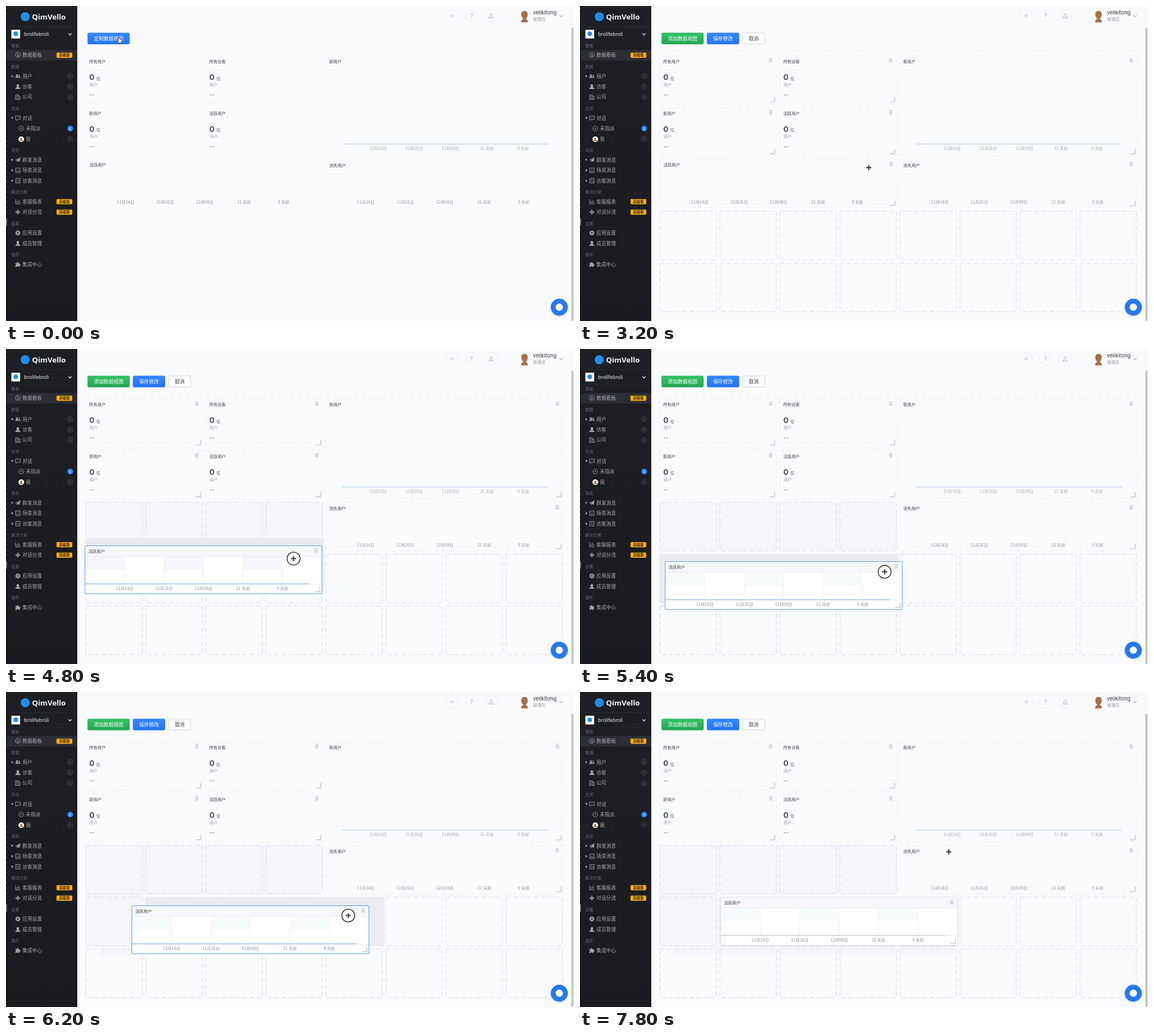
An HTML page that plays this animation: 1004x558 px, repeating every 8000 ms.

```html
<!DOCTYPE html>
<html>
<head>
<meta charset="utf-8">
<title>Dashboard layout</title>
<style>
html, body { margin: 0; width: 100%; height: 100%; overflow: hidden; background: #f9fafc; }
svg { display: block; width: 1004px; height: 558px; }
text { font-family: 'Noto Sans CJK SC', 'Noto Sans CJK JP', 'Noto Sans', sans-serif; white-space: pre; }
.latin { font-family: Inter, 'Noto Sans', sans-serif; }
.brand { font-family: 'Open Sans', 'Noto Sans', sans-serif; }
.dashes { font-family: 'Liberation Sans', sans-serif; letter-spacing: .9px; }
</style>
</head>
<body>
<svg id="stage" viewBox="0 0 1004 558">
  <defs>
    <linearGradient id="blue" x2="0" y2="1"><stop stop-color="#3488ff"/><stop offset="1" stop-color="#2474f4"/></linearGradient>
    <linearGradient id="green" x2="0" y2="1"><stop stop-color="#31c266"/><stop offset="1" stop-color="#23a853"/></linearGradient>
    <linearGradient id="side" x2="0" y2="1"><stop stop-color="#1d1f23"/><stop offset="1" stop-color="#191b1e"/></linearGradient>
    <filter id="soft" x="-40%" y="-40%" width="180%" height="180%"><feDropShadow dx="0" dy="1" stdDeviation="1.6" flood-color="#234" flood-opacity=".3"/></filter>
    <filter id="faint" x="-5%" y="-10%" width="110%" height="125%"><feDropShadow dx="0" dy="1" stdDeviation="1.4" flood-color="#334" flood-opacity=".12"/></filter>
  </defs>
</svg>
<script>
const NS = 'http://www.w3.org/2000/svg';
const stage = document.getElementById('stage');

function add(parent, tag, attrs = {}) {
  const el = document.createElementNS(NS, tag);
  set(el, attrs);
  return parent.appendChild(el);
}
function set(el, attrs) { for (const k in attrs) el.setAttribute(k, attrs[k]); }
const group = (p, attrs) => add(p, 'g', attrs);
const rect = (p, x, y, width, height, fill, more) => add(p, 'rect', { x, y, width, height, fill, ...more });
const circle = (p, cx, cy, r, fill, more) => add(p, 'circle', { cx, cy, r, fill, ...more });
const path = (p, d, more) => add(p, 'path', { d, fill: 'none', ...more });

// y is the optical middle of the line
function text(p, x, y, str, size, fill, more) {
  const el = add(p, 'text', { x, y: y + size * 0.37, 'font-size': size, fill, ...more });
  el.textContent = str;
  return el;
}
const centred = (p, x, y, str, size, fill, more) =>
  text(p, x, y, str, size, fill, { 'text-anchor': 'middle', ...more });

const PERSON = 'M-4.4 4.2C-4.4 1.8-2.4 1.6-1.3.9-3-1.2-2.6-4.3 0-4.3S3-1.2 1.3.9C2.4 1.6 4.4 1.8 4.4 4.2z';
const ICONS = {
  gauge: { line: 'M-2.6 3.3A4.3 4.3 0 1 1 2.6 3.3zM0 2L-1-2M0 2L2-1' },
  users: { fill: 'M-4.8 3C-4.8 1-3.3 1-2.6.6-4-1.2-3.4-3.4-1.6-3.4S.6-1.2-.6.6C.2 1 1.6 1 1.6 3zM2.2 3C2.2 1.6 1.6 1 1 .6 2-1 1.6-2.4 1-3 3.4-3.6 4-1 2.8.6 3.6 1 4.8 1 4.8 3z' },
  user: { fill: PERSON },
  building: { line: 'M-4 4.2V-4H1V4.2M1-1.5H4V4.2M-4.6 4.2H4.6M-2.5-2H-.5M-2.5 0H-.5M-2.5 2H-.5' },
  chat: { line: 'M-4.3-3.6H4.3V2.4H-1L-3 4.2V2.4H-4.3zM-2-.6H-1.4M-.3-.6H.3M1.4-.6H2' },
  target: { line: 'M-4.2 0A4.2 4.2 0 1 1 4.2 0A4.2 4.2 0 1 1-4.2 0M-1.3 0H1.3M0-1.3V1.3' },
  plane: { fill: 'M-4.6.6L4.5-4.2 3 3.8.2 2.5-1.6 4.4-1.7 1.8 2.6-2.2-2.8 1.5z' },
  card: { line: 'M-4-4H4V4H-4zM-2.4 2.4C-2 .4 2 .4 2.4 2.4M0-2.2V-.4' },
  feed: { line: 'M-4-4H4V4H-4zM-2.2-1.8C.6-1.8 2-.2 2 2.2M-2.2.4C-.8.4-.2 1-.2 2.2' },
  bars: { line: 'M-4-4V4H4.4M-1.8 2.4V-.6M.6 2.4V-3.4M3 2.4V-1.4' },
  split: { fill: 'M0-4.6L2-2.3H.7V-.7H2.3V-2L4.6 0 2.3 2V.7H.7V2.3H2L0 4.6-2 2.3H-.7V.7H-2.3V2L-4.6 0-2.3-2V-.7H-.7V-2.3H-2z' },
  puzzle: { fill: 'M-4.4-2H-1.6C-2.6-4.6 1.4-4.6.6-2H3V.2C5.4-.6 5.4 3 3 2.2V4.4H.6C1.2 2.4-1.8 2.4-1.4 4.4H-4.4V2C-2.4 2.6-2.4-.4-4.4.2z' }
};
function icon(p, name, x, y, color) {
  const g = group(p, { transform: `translate(${x} ${y})` });
  if (name === 'gear') {
    circle(g, 0, 0, 2.4, 'none', { stroke: color, 'stroke-width': 1.9 });
    circle(g, 0, 0, 3.8, 'none', { stroke: color, 'stroke-width': 1.6, 'stroke-dasharray': '1.7 1.28' });
  } else if (ICONS[name].fill) path(g, ICONS[name].fill, { fill: color });
  else path(g, ICONS[name].line, { stroke: color, 'stroke-width': 0.9 });
}

function sidebar() {
  const g = group(stage);
  rect(g, 0, 0, 126, 558, 'url(#side)');
  rect(g, 0, 0, 1.5, 558, '#101113');
  path(g, 'M.6 4V22M.6 238V372', { stroke: '#777', 'stroke-width': 1, 'stroke-dasharray': '2 7' });
  rect(g, 0, 376, 1.5, 13, '#8c8f94');
  rect(g, 1.5, 36, 124.5, 1, '#292b30');
  rect(g, 1.5, 63, 124.5, 1, '#24262a');
  rect(g, 1.5, 78, 124.5, 18.5, '#2c2e35');
  circle(g, 34, 19, 8, '#1f8ceb');
  text(g, 46, 19.5, 'QimVello', 13.2, '#f4f5f6', { class: 'brand', 'font-weight': 700 });
  rect(g, 9.5, 42, 15.5, 15.5, '#fff', { rx: 1 });
  circle(g, 17.2, 49.2, 4, '#2389e8');
  text(g, 32, 49.5, 'brolifebroli', 8.7, '#e8e9eb', { class: 'latin' });
  path(g, 'M110.5 48.5L113.3 51.5 116 48.5', { stroke: '#ddd', 'stroke-width': 1.4 });

  const heads = [['看板', 70.5], ['数据', 107], ['交流', 181.5], ['消息', 255.5],
    ['解决方案', 329.5], ['设置', 385], ['插件', 440.5]];
  for (const [s, y] of heads) text(g, 9, y, s, 7.2, '#686a70');

  // label, y, icon, arrow, badge
  const rows = [['数据看板', 87, 'gauge', '', 'pro'], ['用户', 124.3, 'users', 'r', '0'],
    ['访客', 142.7, 'user', '', '0'], ['公司', 161.2, 'building', '', '0'], ['对话', 198.5, 'chat', 'd', ''],
    ['群发消息', 272.3, 'plane', 'r', ''], ['场景消息', 291, 'card', 'r', ''], ['访客消息', 309.5, 'feed', 'r', ''],
    ['客服报表', 346.5, 'bars', '', 'pro'], ['对话分流', 365, 'split', '', 'pro'],
    ['应用设置', 402, 'gear', '', ''], ['成员管理', 420.5, 'user', '', ''], ['集成中心', 457.5, 'puzzle', '', '']];
  for (const [s, y, name, arrow, badge] of rows) {
    icon(g, name, 21, y, '#a4a6ab');
    text(g, 29, y, s, 8.65, '#a9abb0');
    if (arrow) path(g, arrow === 'r' ? `M9.8 ${y - 2.4}L13.2 ${y} 9.8 ${y + 2.4}z` : `M8.8 ${y - 1.5}H13.6L11.2 ${y + 1.8}z`, { fill: '#a4a6ab' });
    if (badge === 'pro') {
      rect(g, 89.3, y - 4.6, 27.8, 9.3, '#fbae17', { rx: 1.6 });
      centred(g, 103.2, y, '高级版', 6.3, '#3a2a08', { 'font-weight': 700 });
    }
    if (badge === '0') count(g, y, false);
  }
  icon(g, 'target', 27, 217, '#a4a6ab');
  text(g, 35, 217, '未指派', 8.65, '#a9abb0');
  count(g, 217, true);
  circle(g, 27, 236, 5, '#fff');
  path(g, PERSON, { fill: '#a8704a', transform: 'translate(27 236.2) scale(.72)' });
  text(g, 35, 235.8, '我', 8.65, '#a9abb0');
  count(g, 235.8, false);
}
function count(g, y, on) {
  circle(g, 113.4, y, 4.8, on ? '#2a7cf6' : 'none', { stroke: on ? '#2a7cf6' : '#55575c', 'stroke-width': 0.8 });
  centred(g, 113.4, y, '0', 7, on ? '#fff' : '#75777c');
}

function topbar() {
  const g = group(stage);
  for (const x of [789, 823, 857.5])
    circle(g, x, 17.5, 10.6, 'none', { stroke: '#dcdee2', 'stroke-width': 0.8, 'stroke-dasharray': '2.5 1.6' });
  path(g, 'M785 17.5H793M789 13.5V21.5', { stroke: '#c0c2c6', 'stroke-width': 0.9 });
  centred(g, 823, 17.5, '?', 10.5, '#b0b2b6', { class: 'latin' });
  path(g, PERSON, { stroke: '#b0b2b6', 'stroke-width': 1.1, transform: 'translate(857.5 17.5) scale(.9)' });
  path(g, 'M910.5 29C910.5 24.5 912.5 24 914.6 23 908.5 17 910 8.5 916.5 8.5S924.5 17 918.6 23C920.6 24 922.3 24.5 922.3 29z', { fill: '#a8704a' });
  text(g, 931.5, 12, 'velikitong', 9.2, '#33363b', { class: 'latin' });
  text(g, 931.5, 23.3, '管理员', 7.4, '#96999e');
  path(g, 'M978.3 16.3L981 19 983.8 16.3', { stroke: '#888b90', 'stroke-width': 1 });
  rect(g, 999.5, 38, 3.5, 520, '#c1c2c4', { rx: 1.7 });
}

function button(p, x, w, label, fill, ink, stroke) {
  rect(p, x, 47.8, w, 19.6, fill, { rx: 2, stroke, 'stroke-width': 0.7 });
  centred(p, x + w / 2, 57.6, label, 8.7, ink);
}
function frame(p, x, y, w, h, color, width) {
  rect(p, x, y, w, h, 'none', { stroke: color, 'stroke-width': width, 'stroke-dasharray': '7.5 5' });
}
function tools(p, trashX, trashY, x, y) {
  rect(p, trashX - 2.9, trashY - 2.2, 5.8, 6.2, '#dadce0', { rx: 0.6 });
  path(p, `M${trashX - 3.6} ${trashY - 3.2}H${trashX + 3.6}M${trashX - 1.2} ${trashY - 4.2}H${trashX + 1.2}`, { stroke: '#d0d2d6', 'stroke-width': 0.9 });
  path(p, `M${x - 9} ${y}H${x}V${y - 9}`, { stroke: '#b6b8bc', 'stroke-width': 1.1 });
}
const DATES = ['11月14日', '11月26日', '12月08日', '21 天前', '9 天前'];
function dates(p, x, y, gap, ink) {
  DATES.forEach((s, i) => centred(p, x + i * gap, y, s, 7.3, ink, { 'font-weight': 300 }));
}
const INK = '#3f4247', SOLID = '#dfe0e4', LIGHT = '#ebecef', WASH = '#f5f6fa';

function cells(p, row, from, to) {
  for (let i = from; i < to; i++) frame(p, 141.3 + i * 106.07, 88 + row * 91.85, 99.6, 86, SOLID, 1.2);
}

sidebar();
topbar();

const view = group(stage);
button(view, 144.4, 73.8, '定制数据视图', 'url(#blue)', '#fff', '#2878f4');

const edit = group(stage);
button(edit, 144.4, 73.8, '添加数据视图', 'url(#green)', '#fff', '#26ac56');
button(edit, 224.6, 56.4, '保存修改', 'url(#blue)', '#fff', '#2878f4');
button(edit, 287.6, 39, '取消', '#fdfdfe', INK, '#bfc2c8');
cells(edit, 3, 0, 8);
cells(edit, 4, 0, 8);

const stats = group(stage);
const cards = [['所有用户', 141, 88], ['所有访客', 353.2, 88], ['新用户', 141, 179.8], ['活跃用户', 353.2, 179.8]];
for (const [s, x, y] of cards) {
  text(stats, x + 6, y + 10.2, s, 7.3, INK);
  text(stats, x + 6.3, y + 37.8, '0', 13.5, '#33363b', { class: 'latin', 'font-weight': 600 });
  text(stats, x + 18.6, y + 40, '位', 7.2, '#55585d');
  text(stats, x + 6.6, y + 51.8, '用户', 7.2, '#a2a4a9', { 'font-weight': 300 });
  text(stats, x + 6.6, y + 68.2, '--', 10.5, '#55585d', { class: 'dashes' });
  frame(edit, x + 0.3, y, 206, 86, LIGHT, 0.9);
  tools(edit, x + 196, y + 8.6, x + 203, y + 82);
}
text(stats, 571.3, 98.2, '新用户', 7.3, INK);
rect(stats, 594, 244, 363.5, 1, '#b3cae6');
dates(stats, 657.8, 252.7, 64.1, '#a8aaae');
text(stats, 571.3, 282, '流失用户', 7.3, INK);
dates(stats, 636, 347.7, 69.8, '#96989d');
frame(edit, 565.5, 88, 419, 177.6, LIGHT, 0.9);
tools(edit, 974.6, 96.6, 981.3, 262);
frame(edit, 565.5, 271.7, 419, 86, LIGHT, 0.9);
tools(edit, 974.6, 280.4, 981.3, 353.8);

// vacated area, drop slot, then the movable card
const gap = group(stage);
const wash = rect(gap, 140, 271, 422, 0, WASH);
const washLeft = rect(gap, 140, 358, 106.5, 92, WASH);
const washLow = rect(gap, 165, 450, 495, 17, WASH, { rx: 6 });
cells(gap, 2, 0, 4);
cells(gap, 3, 0, 1);
cells(gap, 4, 0, 5);
const slot = rect(stage, 140, 271, 422, 86.5, '#ebecf0');

const card = group(stage);
const idle = group(card);
frame(idle, 0.3, 0, 418.5, 86, LIGHT, 0.9);
const lifted = group(card);
const box = rect(lifted, 0, 0, 419, 85, '#fff', { rx: 1.5 });
rect(lifted, 0.5, 0.5, 418, 18, '#f6f7fb');
rect(lifted, 0.5, 18.5, 418, 1, '#e9ebee');
const bands = group(lifted);
for (let i = 0; i < 6; i++) {
  if (i % 2 === 0) add(bands, 'rect', { x: i * 69.8 + 0.5, y: 19.5, width: 69, height: 22.6 });
  if (i) rect(lifted, Math.round(i * 69.8) - 0.5, 19.5, 1, 48, '#f0f1f4');
}
rect(lifted, 0.5, 67.5, 418, 1, '#eceef1');
const axis = rect(lifted, 0.5, 67, 396, 1.1, '#7db2ea');
const outline = rect(lifted, 0, 0, 419, 85, 'none', { rx: 1.5, 'stroke-width': 1 });
text(card, 6, 10, '活跃用户', 7.3, INK);
dates(card, 70, 75.8, 69.8, '#8c8e93');
const cardTools = group(card);
tools(cardTools, 408.7, 8.6, 415.5, 81.8);

const help = group(stage, { filter: 'url(#soft)' });
circle(help, 978, 533.5, 15, '#2878ea');
circle(help, 978, 533.5, 6.5, '#fff');

const pointer = group(stage);
const shapes = {
  hand: group(pointer), arrow: group(pointer), cross: group(pointer), ring: group(pointer)
};
path(shapes.hand, 'M-1.2-5C.2-5.6.6-4.6.6-4V-1.4C1.6-1.8 2.2-1.4 2.4-1 3.6-1.2 4.4-.6 4.4.6V2.4L3.4 5.4H-1.4L-4 1.6C-4.2.6-3.2.2-1.9 1.5V-4C-1.9-4.5-1.6-5-1.2-5z',
  { fill: '#fff', stroke: '#111', 'stroke-width': 0.9 });
path(shapes.arrow, 'M0 0V8.8L2 7 3.6 10.4 5.2 9.7 3.7 6.4H6.3z', { fill: '#000', stroke: '#fff', 'stroke-width': 0.7 });
circle(shapes.ring, 0, 0, 11.4, 'rgba(255,255,255,.75)', { stroke: '#111', 'stroke-width': 1.3 });
for (const p of [shapes.ring, shapes.cross])
  path(p, 'M0-4.6L1.8-2.5H.6V-.6H2.5V-1.8L4.6 0 2.5 1.8V.6H.6V2.5H1.8L0 4.6-1.8 2.5H-.6V.6H-2.5V1.8L-4.6 0-2.5-1.8V-.6H-.6V-2.5H-1.8z',
    { fill: '#000', stroke: '#fff', 'stroke-width': 0.8, 'paint-order': 'stroke' });

// time, x, y
const CURSOR = [[0, 200.5, 60], [600, 200.5, 60], [800, 247, 73], [1000, 259, 106], [1200, 283.6, 256.4],
  [2400, 283.6, 256.4], [2600, 441, 313], [2800, 514, 298], [3000, 514, 298], [3200, 510.5, 286.4], [3600, 510.5, 286.4],
  [4200, 509.5, 322], [4800, 508.3, 371.3], [5000, 508.3, 385], [5200, 515, 394], [5800, 585.5, 396],
  [6000, 600, 396], [6400, 610, 396], [6600, 610, 396], [6800, 609.5, 391.5], [7000, 609.5, 391.5],
  [7400, 627, 331], [7600, 647, 292], [7800, 651.8, 283.2]];
const CARD = [[3600, 141, 271.7], [3800, 141, 275], [4200, 140.5, 301], [4800, 139.6, 348.7], [5000, 140, 362],
  [5200, 142, 372], [5400, 150, 376.5], [5800, 178.2, 377.4], [6200, 222, 378], [6600, 241, 378],
  [6800, 241, 378], [7000, 248.2, 363.7]];
const SLOT = [[4600, 140, 271], [4800, 140, 335], [5000, 140, 363.3], [5800, 140, 363.3], [6200, 246.8, 363.3]];

function at(keys, t) {
  let i = 0;
  while (i < keys.length - 1 && keys[i + 1][0] <= t) i++;
  const a = keys[i], b = keys[i + 1];
  if (!b || t <= a[0]) return a.slice(1);
  const k = (t - a[0]) / (b[0] - a[0]);
  return [a[1] + (b[1] - a[1]) * k, a[2] + (b[2] - a[2]) * k];
}
const show = (el, on) => el.setAttribute('display', on ? 'inline' : 'none');
const move = (el, [x, y]) => el.setAttribute('transform', `translate(${x} ${y})`);
const crisp = v => Math.floor(v) + 0.5;

function draw(t) {
  const editing = t >= 400, moved = t >= 3600, held = moved && t < 7000;
  show(view, !editing);
  show(edit, editing);
  show(idle, editing && !moved);
  show(cardTools, editing);
  show(gap, moved);
  show(lifted, moved);
  show(slot, held);

  const [sx, sy] = at(SLOT, t);
  set(slot, { x: sx, y: sy });
  wash.setAttribute('height', Math.min(sy, 358) - 271);
  show(washLeft, t >= 6000);
  show(washLow, t >= 6000);
  washLow.setAttribute('width', t < 7000 ? 75 : 497);

  move(card, at(CARD, t).map(crisp));
  outline.setAttribute('stroke', held ? '#5c9de8' : '#e2e4e9');
  box.setAttribute('filter', held ? 'none' : 'url(#faint)');
  bands.setAttribute('fill', t < 5000 ? WASH : '#f7fafb');
  axis.setAttribute('fill', held ? '#7db2ea' : '#bfc2c6');

  const kind = t < 800 ? 'hand' : t < 3200 ? 'arrow' : t < 3600 ? 'cross'
    : t < 6800 ? 'ring' : t < 7800 ? 'arrow' : 'cross';
  for (const k in shapes) show(shapes[k], k === kind);
  move(pointer, at(CURSOR, t));
}

// the picture refreshes five times a second
const LOOP = 8000, STEP = 200;
function tick() {
  draw(Math.floor(performance.now() % LOOP / STEP) * STEP);
  requestAnimationFrame(tick);
}
tick();
</script>
</body>
</html>
```
